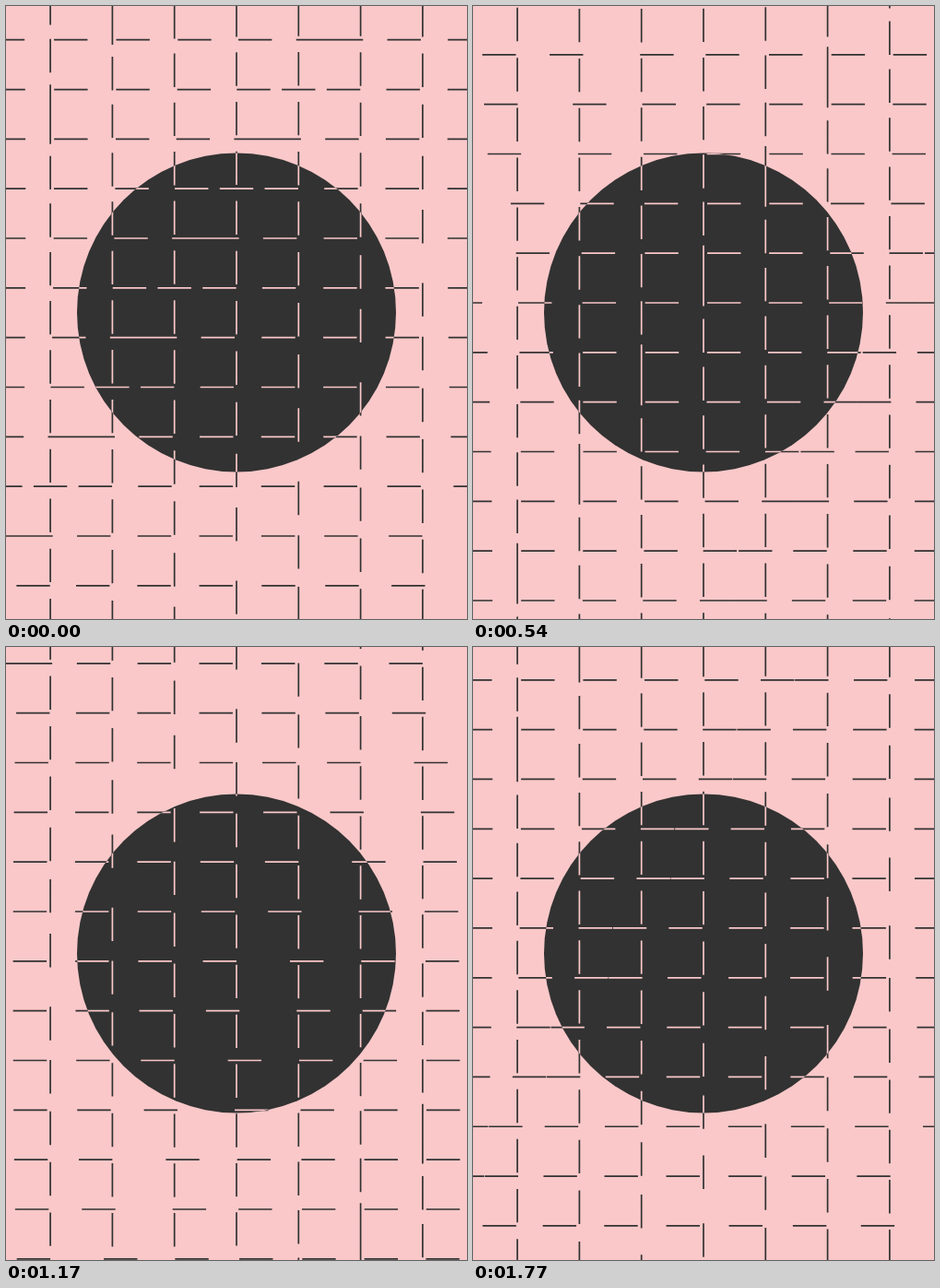
These frames come from a looping animation (500 by 665 pixels, 1.8 s). An HTML page with a canvas:

```html
<!DOCTYPE html>
<html lang="en">
<head>
<meta charset="utf-8">
<title>Drifting grid</title>
<style>
  html, body { margin: 0; width: 100%; height: 100%; overflow: hidden; background: #fac8c9; }
  canvas { display: block; }
</style>
</head>
<body>
<canvas id="stage" width="500" height="665"></canvas>
<script>
const ctx = document.getElementById('stage').getContext('2d');
const W = 500, H = 665;
const PINK = '#fac8c9', DARK = '#323232';
const LOOP = 1800, STEP = 30;
const COL = 67.3, ROW = 53.83;      // grid spacing
const LEFT = 48.1, TOP = 36.7;      // first crossing at time zero
const HALF = 18.2, SWING = 22.3;    // dash half length, travel either side of a crossing
const PERIOD = 15;                  // wave length in columns; one row counts as half a column

// Eased square wave, equal to cubic-bezier(1,0,0,1) in both directions
function wave(u) {
  u = ((u + PERIOD / 4) % PERIOD + PERIOD) % PERIOD - PERIOD / 4;
  const sign = u > PERIOD / 4 ? -1 : 1;
  if (sign < 0) u -= PERIOD / 2;
  const h = Math.cbrt(u / (2 * PERIOD));
  return sign * (3 * h - 4 * h ** 3);
}

function dashes(p) {
  const path = new Path2D();
  const front = 4.5 + (PERIOD - 0.5) * p;
  for (let r = -2; r <= 13; r++) {
    const y = TOP + ROW * (r + p);
    for (let c = -2; c <= 8; c++) {
      const x = LEFT + COL * c;
      const u = c + r / 2 - front;
      const dx = -SWING * wave(u);
      const dy = -SWING * wave(u + PERIOD / 4);
      path.moveTo(x + dx - HALF, y);
      path.lineTo(x + dx + HALF, y);
      path.moveTo(x, y + dy - HALF);
      path.lineTo(x, y + dy + HALF);
    }
  }
  return path;
}

const disc = new Path2D();
disc.arc(W / 2, H / 2, 173, 0, Math.PI * 2);

function draw(p) {
  const lines = dashes(p);
  ctx.lineWidth = 1.7;
  ctx.fillStyle = PINK;
  ctx.fillRect(0, 0, W, H);
  ctx.strokeStyle = DARK;
  ctx.stroke(lines);
  ctx.fillStyle = DARK;
  ctx.fill(disc);
  ctx.save();
  ctx.clip(disc);
  ctx.strokeStyle = PINK;
  ctx.stroke(lines);
  ctx.restore();
}

const start = performance.now();
function tick() {
  const t = (performance.now() - start) % LOOP;
  draw(Math.floor(t / STEP) * STEP / LOOP);
  requestAnimationFrame(tick);
}
tick();
</script>
</body>
</html>
```
